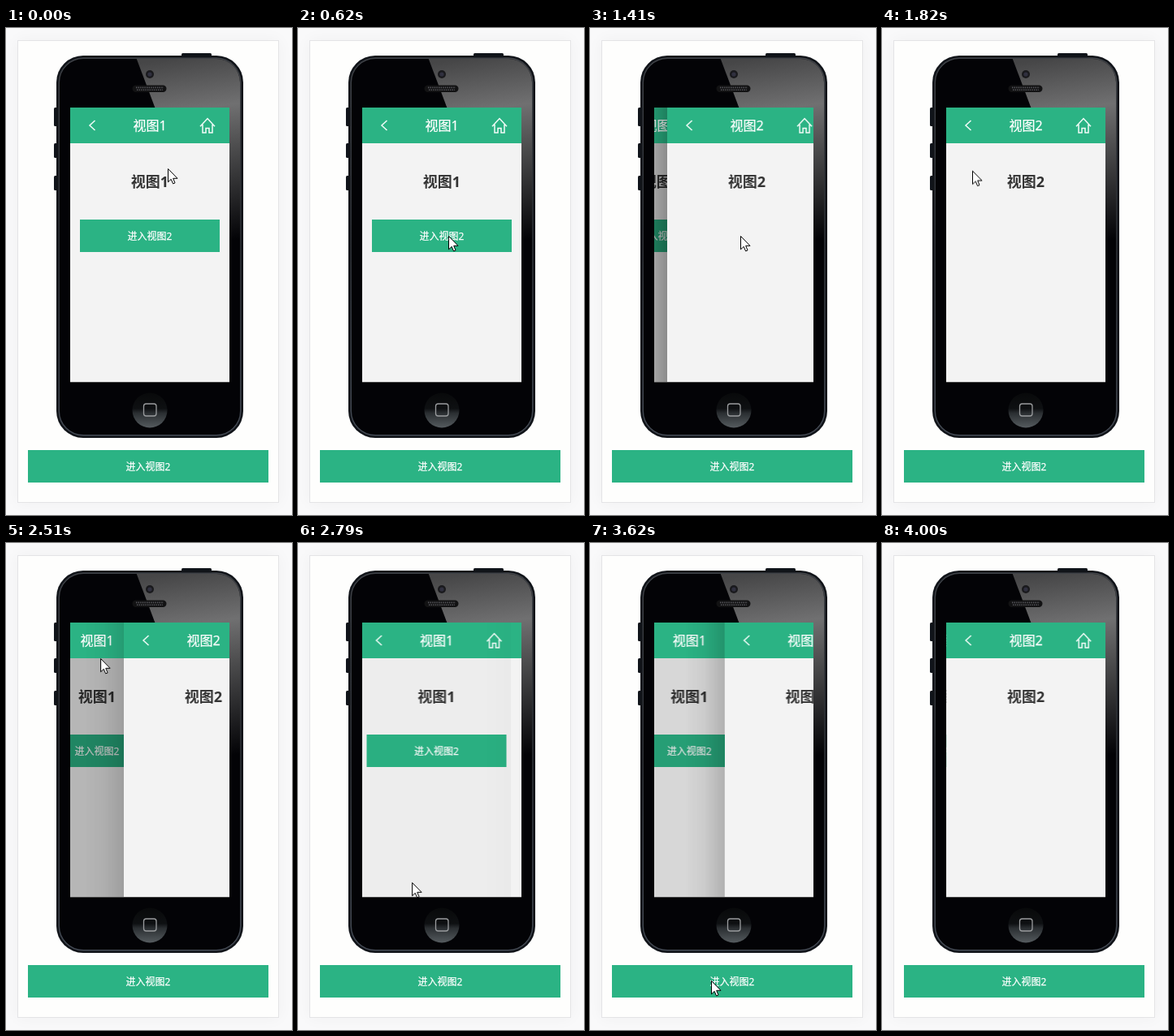
Recreate the animation shown at these times as an HTML page. Size 352 px wide and 600 px high, loop 4510 ms.

```html
<!DOCTYPE html>
<html lang="zh-CN">
<head>
<meta charset="utf-8">
<title>视图切换</title>
<style>
  html, body { margin: 0; width: 100%; height: 100%; overflow: hidden; background: #f9f9fa; }
  svg { display: block; }
  .card { position: absolute; left: 14px; top: 15px; width: 320px; height: 568px;
    background: #fefefd; border: 1px solid #e4e4e6; box-shadow: 0 0 18px rgba(0, 0, 30, .045); }
  .stage { position: absolute; left: 0; top: 0; }
  text { font-family: "Open Sans", "Noto Sans CJK SC", "Noto Sans CJK", sans-serif; text-anchor: middle; fill: #fff; }
  .title { font-size: 16px; }
  .head { font-size: 18px; font-weight: 700; fill: #333; }
  .label { font-size: 12px; }
  .title, .label { stroke: #fff; stroke-width: .25; }
  .green { fill: #2bb384; }
  .icon { fill: none; stroke: #f2fcf8; stroke-width: 1.5; }
</style>
</head>
<body>
<div class="card"></div>
<svg class="stage" width="352" height="600" viewBox="0 0 352 600">
  <defs>
    <clipPath id="screen"><rect x="79" y="98" width="196" height="338"/></clipPath>
    <clipPath id="face"><rect x="66" y="38" width="222" height="463" rx="29"/></clipPath>
    <linearGradient id="rim" x1="0" y1="0" x2="0" y2="1">
      <stop offset="0" stop-color="#3f4247"/><stop offset=".5" stop-color="#2b2e33"/><stop offset="1" stop-color="#454b55"/>
    </linearGradient>
    <linearGradient id="gloss" gradientUnits="userSpaceOnUse" x1="220" y1="36" x2="250" y2="265">
      <stop offset="0" stop-color="#464647"/><stop offset=".28" stop-color="#707071"/>
      <stop offset=".5" stop-color="#4e4e4f"/><stop offset="1" stop-color="#030306"/>
    </linearGradient>
    <linearGradient id="homeFill" x1="0" y1="0" x2="0" y2="1">
      <stop offset="0" stop-color="#08090a"/><stop offset=".45" stop-color="#0e1012"/>
      <stop offset=".58" stop-color="#2a2e31"/><stop offset="1" stop-color="#555b5f"/>
    </linearGradient>
    <linearGradient id="shade">
      <stop offset="0" stop-color="#000" stop-opacity="0"/>
      <stop offset=".5" stop-color="#000" stop-opacity=".3"/>
      <stop offset="1" stop-color="#000"/>
    </linearGradient>
    <g id="icons" class="icon">
      <path d="M109.5 114 103 120l6.5 6"/>
      <path d="M239 121.3 248 111.5l9 9.8M242 119v10h4v-5.5h4v5.5h4v-10"/>
    </g>
  </defs>

  <g fill="#10141a">
    <rect x="216" y="31" width="37" height="6" rx="1.5"/>
    <rect x="59" y="98" width="6" height="23" rx="1.5"/>
    <rect x="59" y="142" width="6" height="18" rx="1.5"/>
    <rect x="59" y="182" width="6" height="18" rx="1.5"/>
  </g>
  <rect x="62" y="34" width="230" height="471" rx="33" fill="#111419"/>
  <rect x="65.3" y="37.3" width="223.4" height="464.4" rx="30" fill="#030306" stroke="url(#rim)" stroke-width="1.4"/>
  <path d="M160 36H292V275H250Z" fill="url(#gloss)" clip-path="url(#face)"/>
  <circle cx="177" cy="57" r="5" fill="#1a1a1d"/>
  <circle cx="177" cy="57" r="2.6" fill="#30303f"/>
  <rect x="155.5" y="70.5" width="42" height="8.5" rx="4.2" fill="#121213"/>
  <path d="M160 73.4h34M161 76.2h32" stroke="#55555a" stroke-width="1.6" stroke-dasharray="1.4 1.2"/>
  <rect x="79" y="436" width="196" height="1" fill="#444"/>
  <circle cx="177" cy="471" r="21.5" fill="url(#homeFill)"/>
  <rect x="169.5" y="463" width="15.5" height="15" rx="3" fill="none" stroke="#9a9c9e" stroke-width="1.3"/>

  <g clip-path="url(#screen)">
    <g id="view1">
      <rect x="79" y="98" width="196" height="338" fill="#f3f3f3"/>
      <text class="head" x="177" y="196">视图1</text>
      <rect class="green" x="91" y="236" width="172" height="40"/>
      <text class="label" x="177" y="261">进入视图2</text>
      <rect id="dim" x="79" y="142" width="196" height="294" opacity="0"/>
      <rect class="green" x="79" y="98" width="196" height="44"/>
      <text class="title" x="177" y="126">视图1</text>
      <use href="#icons"/>
    </g>
    <g id="view2">
      <rect id="edge" x="29" y="98" width="50" height="338" fill="url(#shade)" opacity="0"/>
      <rect x="79" y="98" width="196" height="338" fill="#f3f3f3"/>
      <text class="head" x="177" y="196">视图2</text>
      <rect class="green" x="79" y="98" width="196" height="44"/>
      <text class="title" x="177" y="126">视图2</text>
      <use href="#icons"/>
    </g>
  </g>

  <rect class="green" x="27" y="520" width="296" height="40"/>
  <text class="label" x="175" y="545">进入视图2</text>

  <path id="cursor" d="M.5.5V16.8L4.2 13.3 6.6 18.9 9 17.9 6.7 12.3H12Z" fill="#fff" stroke="#000"/>
</svg>
<script>
const LOOP = 4510, SLIDE = 600;
const PUSH = 1019, POP = 2380, PUSH_AGAIN = 3427;
const $ = id => document.getElementById(id);
const shift = (x, y = 0) => ({ transform: `translate(${x}px, ${y}px)` });
const fade = opacity => ({ opacity });

// steps: [ms, style, easing towards the next step]
function play(id, steps) {
  const frames = steps.map(([ms, style, easing = 'linear']) => ({ offset: ms / LOOP, easing, ...style }));
  $(id).animate(frames, { duration: LOOP, iterations: Infinity });
}

// One value per resting state; popFrom lets the way back start elsewhere.
function slide(id, style, home, away, popFrom = away) {
  play(id, [
    [0, style(home)],
    [PUSH, style(home), 'ease'],
    [PUSH + SLIDE, style(away)],
    [POP - 1, style(away)],
    [POP, style(popFrom), 'ease'],
    [POP + SLIDE, style(home)],
    [PUSH_AGAIN, style(home), 'ease'],
    [PUSH_AGAIN + SLIDE, style(away)],
    [LOOP, style(away)]
  ]);
}

slide('view1', shift, 0, -98);
slide('view2', shift, 196, 0);
slide('dim', fade, 0, .21, .38);
slide('edge', fade, 0, .32, .2);

play('cursor', [
  [0, shift(199, 173)],
  [70, shift(199, 173), 'ease-in-out'],
  [270, shift(198, 251)],
  [380, shift(198, 251), 'ease-in-out'],
  [620, shift(185, 256)],
  [1500, shift(185, 256), 'ease-in'],
  [1820, shift(111, 176), 'ease-out'],
  [2060, shift(103, 117)],
  [2380, shift(103, 117), 'ease-in'],
  [2510, shift(116, 141)],
  [2860, shift(146, 486), 'ease-out'],
  [3130, shift(149, 539)],
  [3650, shift(149, 539), 'ease-in'],
  [3890, shift(342, 527)],
  [3930, shift(372, 522)],
  [LOOP, shift(372, 522)]
]);
</script>
</body>
</html>
```
